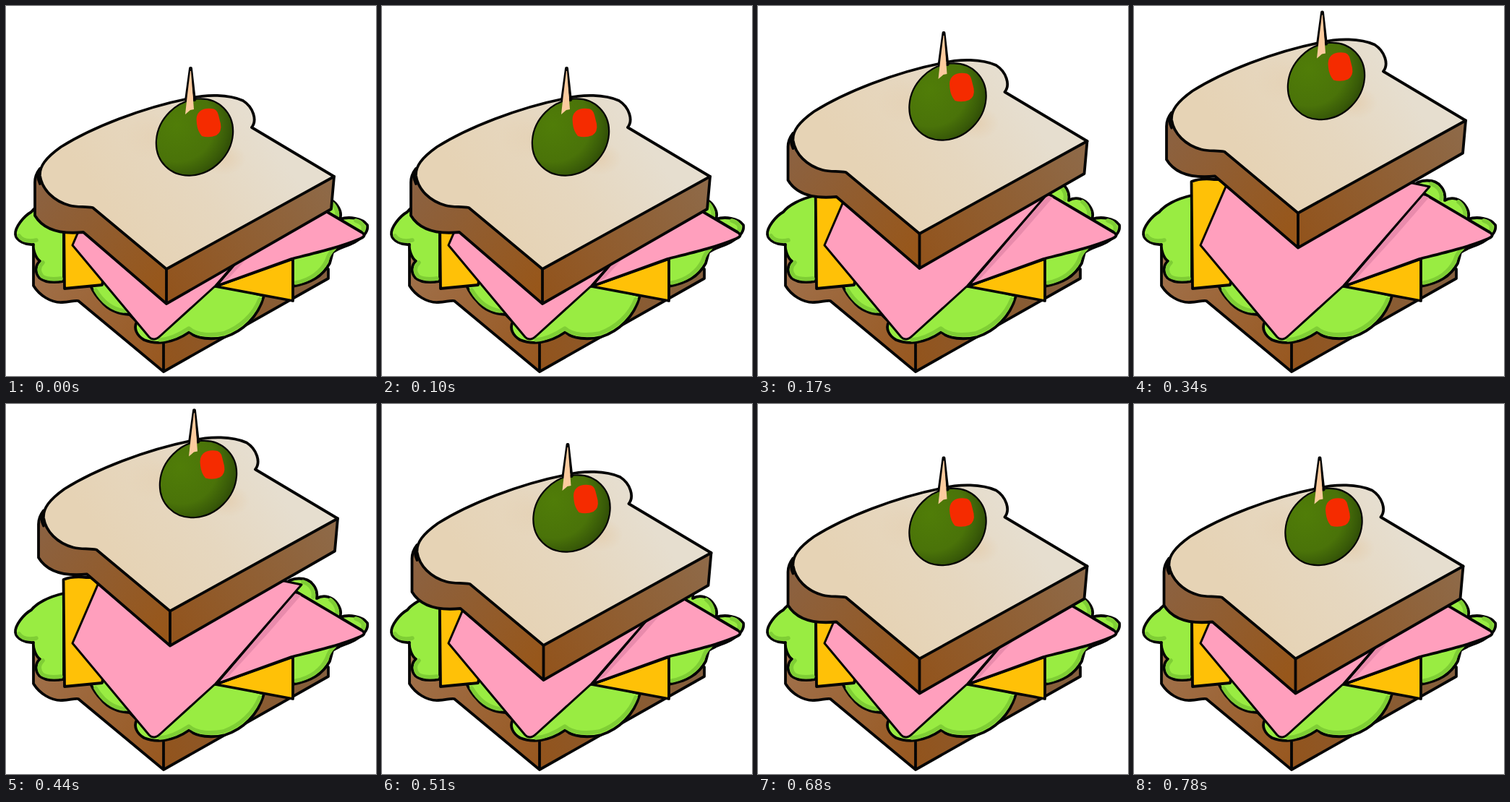
Animation of 512 by 512 pixels, one loop 850 ms. Source, as an HTML page:

```html
<!DOCTYPE html>
<html lang="en">
<head>
<meta charset="utf-8">
<title>Sandwich</title>
<style>
html, body { margin: 0; width: 100%; height: 100%; overflow: hidden; background: #fff; }
svg { display: block; width: 100%; height: 100%; }
.ink { stroke: #050505; stroke-width: 3.8; stroke-linejoin: round; stroke-linecap: round; }
.thin { stroke-width: 3; }
.line { fill: none; }
.leaf { fill: #99ec42; }
.shade { fill: none; stroke: #7fce35; stroke-width: 5.5; stroke-linecap: round; stroke-linejoin: round; }
.cheese { fill: #ffc107; }
.ham { fill: #ff9fbd; }
</style>
</head>
<body>
<svg viewBox="0 0 512 512">
  <defs>
    <linearGradient id="crustL" gradientUnits="userSpaceOnUse" x1="45" y1="240" x2="222" y2="400">
      <stop offset="0" stop-color="#8b6242"/><stop offset="1" stop-color="#985618"/>
    </linearGradient>
    <linearGradient id="crustR" gradientUnits="userSpaceOnUse" x1="454" y1="245" x2="222" y2="390">
      <stop offset="0" stop-color="#8e6a49"/><stop offset="1" stop-color="#92541d"/>
    </linearGradient>
    <linearGradient id="baseL" gradientUnits="userSpaceOnUse" x1="40" y1="350" x2="218" y2="490">
      <stop offset="0" stop-color="#a0714c"/><stop offset="1" stop-color="#985820"/>
    </linearGradient>
    <linearGradient id="baseR" gradientUnits="userSpaceOnUse" x1="446" y1="370" x2="218" y2="490">
      <stop offset="0" stop-color="#84603f"/><stop offset="1" stop-color="#92541d"/>
    </linearGradient>
    <linearGradient id="crumb" gradientUnits="userSpaceOnUse" x1="150" y1="290" x2="335" y2="150">
      <stop offset="0" stop-color="#e6d3b5"/><stop offset=".5" stop-color="#e6d7bf"/><stop offset="1" stop-color="#e6decf"/>
    </linearGradient>
    <radialGradient id="olive" gradientUnits="userSpaceOnUse" cx="256" cy="152" r="86">
      <stop offset="0" stop-color="#507d08"/><stop offset=".6" stop-color="#4a7309"/>
      <stop offset=".82" stop-color="#395b08"/><stop offset="1" stop-color="#294306"/>
    </radialGradient>
    <radialGradient id="glow">
      <stop offset="0" stop-color="#e3c6a0" stop-opacity=".5"/><stop offset="1" stop-color="#e3c6a0" stop-opacity="0"/>
    </radialGradient>
  </defs>

  <!-- lower slice -->
  <path fill="url(#baseL)" d="M38 331V387C46 400 62 411 78 410C88 410 94 407 100 408L218 506V400L100 340Z"/>
  <path fill="url(#baseR)" d="M218 506L446 377V355L218 440Z"/>
  <path class="ink line" d="M38 331V387C46 400 62 411 78 410C88 410 94 407 100 408L218 506L446 377V364M218 466V506"/>

  <!-- lettuce -->
  <path class="ink leaf" d="M80 262C58 267 42 276 35 285C24 291 12 307 13 316C14 325 28 331 38 330C37 337 41 349 47 353C40 359 40 369 46 376C54 383 68 383 80 381Z"/>
  <path class="shade" d="M18 318C23 326 32 326 42 324M51 355C45 361 45 368 50 374C56 378 68 378 76 377"/>
  <path class="ink leaf" d="M385 251C394 238 417 239 425 250C430 256 431 263 430 269C440 263 453 267 459 277C463 283 464 290 462 295C474 291 493 293 500 303C502 313 493 321 482 327C471 333 462 334 452 341C450 349 449 352 448 356C438 374 422 384 396 388L370 330Z"/>
  <path class="shade" d="M411 246C422 250 427 259 425 267M449 271C457 277 460 287 457 292M484 297C492 299 496 304 494 310M401 383C422 379 437 367 444 352Q447 342 454 336"/>
  <path class="ink leaf" d="M117 387C121 396 126 403 132 409C141 420 154 426 171 427L181 437C176 446 181 456 191 462C208 469 231 467 254 451C262 461 286 462 303 458C328 450 349 430 357 401L290 384L150 370Z"/>
  <path class="shade" d="M124 393C131 405 143 419 163 422M213 462C228 461 241 454 253 446C264 456 285 456 301 453C324 445 343 427 351 406"/>

  <!-- cheese and ham -->
  <path class="ink cheese" d="M79.500 243Q92 238 111 240H145L150 290L133 386L81 391Z"/>
  <path class="ink cheese" d="M290 388L397 350V408Z"/>
  <path class="ink ham" d="M402 260L492 313Q500 318 490 322C462 334 427 342 395 350L290 388Z"/>
  <path fill="#e98bac" d="M400 262L297 383L308 377L362 318L408 265Z"/>
  <path class="ink thin ham" d="M92 331L127 250L230 225L375 243L409 250L290 387L214 456Q205 465 198 458Z"/>

  <!-- lifting slice -->
  <g id="lid">
    <path fill="url(#crustL)" d="M46 227L40 240V290C52 310 77 316 107 313L222 412V364L120 279Z"/>
    <path fill="url(#crustR)" d="M222 364L454 236L450 281L222 412Z"/>
    <path class="ink" fill="url(#crumb)" d="M120 279L222 364L454 236L340 168C348 158 342 140 328 131C308 122 278 122 253 128C188 141 119 168 76 195C55 210 46 222 47 235C50 254 66 270 88 276C99 279 109 277 120 279Z"/>
    <ellipse cx="301" cy="211" rx="31" ry="23" fill="url(#glow)"/>
    <ellipse cx="205" cy="181" rx="43" ry="33" fill="url(#glow)" opacity=".45"/>
    <path class="ink line" d="M47 225Q40 234 40 244V290C52 310 77 316 107 313L222 412L450 281L454 236M222 364V412"/>
    <path class="ink line" d="M46 227Q42 235 47 246"/>
    <ellipse cx="261" cy="181.500" rx="57" ry="49" transform="rotate(-45 261 181.500)" fill="url(#olive)" stroke="#050505" stroke-width="2.2"/>
    <path fill="#f52b00" d="M268 146Q274 141 284 142Q292 142 294 151L297 163Q299 174 291 179Q281 183 271 180Q265 173 264 163Q262 151 268 146Z"/>
    <path class="ink" fill="#fccb9e" d="M249 130L255 86L256 86L261 130Z"/>
    <path fill="#fccb9e" d="M250.500 127L255 90H256L260 143L255 144L248 150Z"/>
  </g>
</svg>
<script>
const lid = document.getElementById("lid");
const STEP = 170;
const poses = [[0, 0], [1.5, -49], [5, -77.5], [1.5, -30], [1.5, -11.5]];

function draw(ms) {
  const [x, y] = poses[Math.floor(ms / STEP) % poses.length];
  lid.setAttribute("transform", `translate(${x} ${y})`);
}

const start = performance.now();
function tick() {
  draw(performance.now() - start);
  requestAnimationFrame(tick);
}
tick();
</script>
</body>
</html>
```
